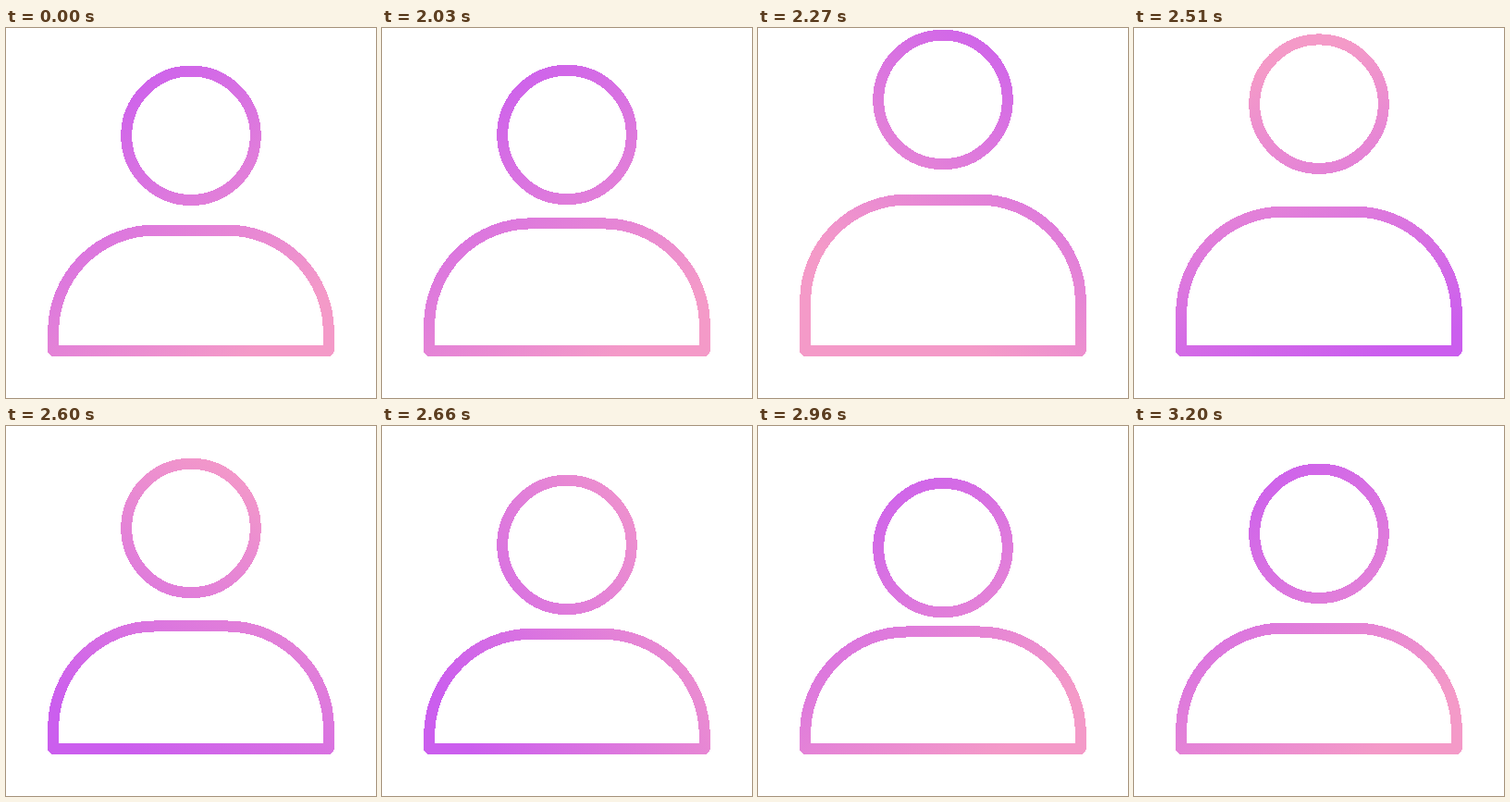
These frames come from a looping animation (400x400 px, 3230 ms). An HTML page:

```html
<!DOCTYPE html>
<html lang="en">
<head>
<meta charset="utf-8">
<title>Avatar</title>
<style>
  html, body { margin: 0; width: 100%; height: 100%; overflow: hidden; background: #fff; }
  svg { display: block; width: 100vw; height: 100vh; }
</style>
</head>
<body>
<svg viewBox="0 0 430 430" shape-rendering="crispEdges">
  <defs>
    <linearGradient id="tint" gradientUnits="userSpaceOnUse">
      <stop offset="0" stop-color="#cb5eee"/>
      <stop offset="1" stop-color="#f49ac8"/>
    </linearGradient>
  </defs>
  <g fill="none" stroke="url(#tint)" stroke-width="12.9" stroke-linejoin="round" stroke-linecap="round">
    <circle id="head" cx="215" cy="125" r="75"/>
    <path id="body"/>
  </g>
</svg>
<script>
const LOOP = 3230, START = 2000, STEP = 30;
const UNIT = 430 / 400;

const inOut = x => x * x * (3 - 2 * x);
const out = x => 1 - (1 - x) ** 3;

// Each row: time, value, easing towards that value.
const headTrack = [[0, 0], [400, -51.7, inOut], [760, 27, inOut], [1200, 0, inOut]];
const bodyTrack = [[0, 0], [390, -34, out], [700, 8.2, inOut], [1200, 0, inOut]];
const turnTrack = [[0, -128], [950, 232, inOut]];
const shiftTrack = [[0, -10], [270, -72, inOut], [510, 0, inOut], [950, -10, inOut]];

function sample(track, t) {
  for (let i = 1; i < track.length; i++) {
    const [t0, v0] = track[i - 1], [t1, v1, ease] = track[i];
    if (t < t1) return v0 + (v1 - v0) * ease((t - t0) / (t1 - t0));
  }
  return track[track.length - 1][1];
}

const tint = document.getElementById('tint');
const head = document.getElementById('head');
const body = document.getElementById('body');

function set(el, attrs) {
  for (const name in attrs) el.setAttribute(name, attrs[name]);
}

function bodyPath(top) {
  const r = 118;
  return `M55 375V${top + r}A${r} ${r} 0 0 1 ${55 + r} ${top}` +
         `H${375 - r}A${r} ${r} 0 0 1 375 ${top + r}V375Z`;
}

function draw(ms) {
  // The motion advances in whole steps.
  const t = Math.max(0, Math.floor((ms - START + 0.5) / STEP) * STEP);
  const angle = sample(turnTrack, t) * Math.PI / 180;
  const dx = 165 * UNIT * Math.cos(angle);
  const dy = 165 * UNIT * Math.sin(angle);
  const cy = 215 + sample(shiftTrack, t) * UNIT;

  set(tint, { x1: 215 + dx, y1: cy + dy, x2: 215 - dx, y2: cy - dy });
  set(head, { cy: 125 + sample(headTrack, t) * UNIT });
  set(body, { d: bodyPath(235 + sample(bodyTrack, t) * UNIT) });
}

const began = performance.now();
function tick() {
  draw((performance.now() - began) % LOOP);
  requestAnimationFrame(tick);
}
draw(0);
requestAnimationFrame(tick);
</script>
</body>
</html>
```
